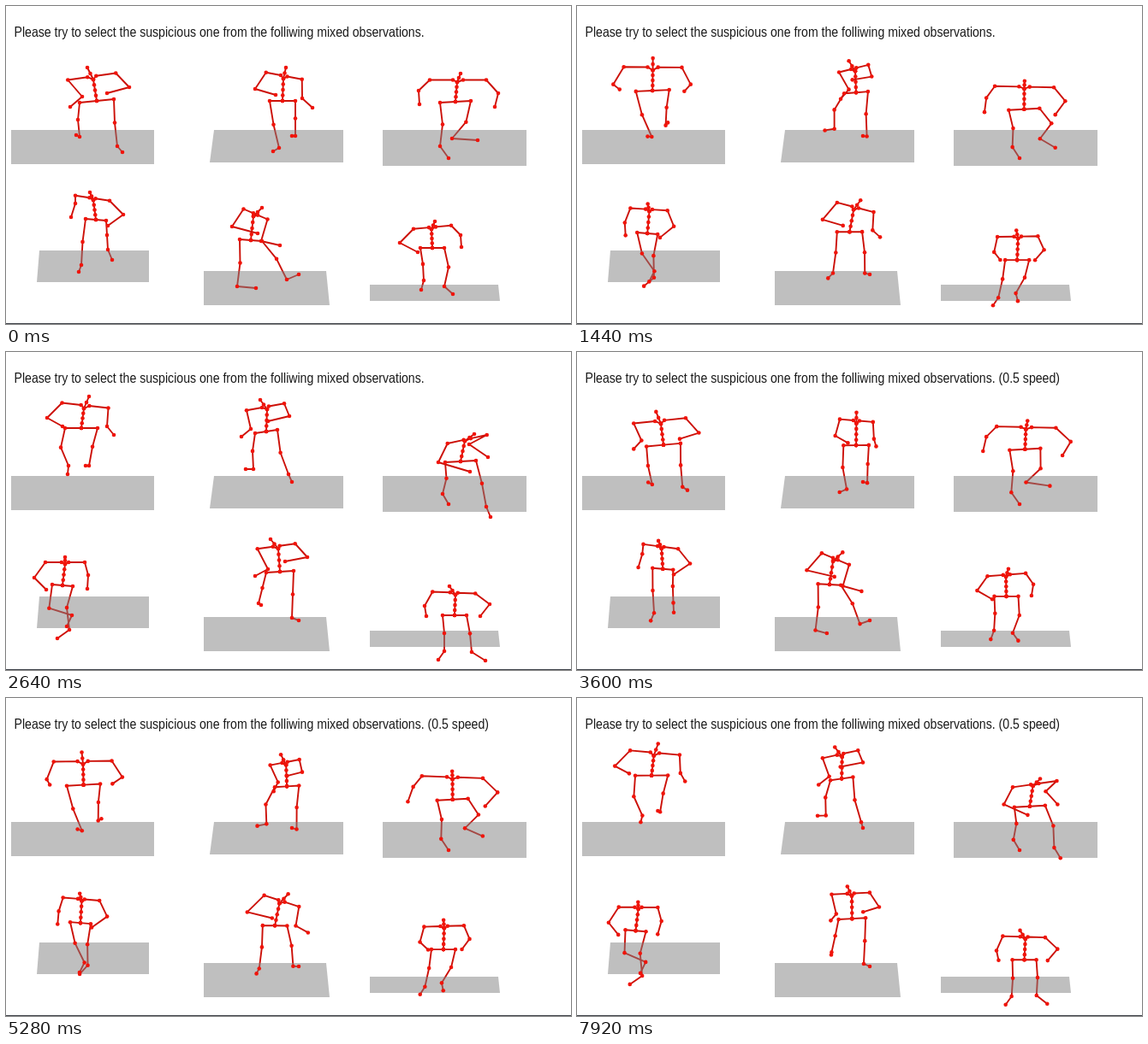
These frames come from a looping animation (660 by 372 pixels, 8000 ms). An HTML page with a canvas:

```html
<!DOCTYPE html>
<html lang="en">
<head>
<meta charset="utf-8">
<title>Mixed observations</title>
<style>
html, body { margin: 0; width: 660px; height: 372px; overflow: hidden; background: #fff; }
canvas { display: block; }
</style>
</head>
<body>
<canvas id="stage" width="660" height="372"></canvas>
<script>
const ctx = document.getElementById('stage').getContext('2d');
const LOOP = 8000, STEP = 80, WALK = 2640, SLOW_FROM = 2840, SLOW_ZERO = 3040;

// Each joint follows a parabola through start, middle and end (two points: a line, one: at rest).
// head is relative to neck; across and hips are half widths; arms hold elbow and hand,
// legs hold knee bend, ankle and toe, left limb first.
const walkers = [
  {
    floor: [[6, 145], [173, 145], [173, 185], [6, 185]],
    neck: [[102, 86], [89, 76], [91, 66]], head: [[-7, -14], [6, -14]],
    across: [[28, -4], [34, 0], [27, 3]],
    pelvis: [[106, 111], [89, 100], [88, 89]], hips: [[20, -2], [19, 0]],
    arms: [[[[89, 106], [44, 93], [48, 77]], [[75, 118], [50, 99], [66, 87]]],
           [[[144, 95], [134, 92], [118, 87]], [[118, 102], [125, 100], [126, 97]]]],
    legs: [[[-2, -2, -7], [[86, 153], [88, 154], [73, 133]], [[82, 151], [83, 153], [72, 143]]],
           [[-1], [[130, 164], [105, 141], [97, 133]], [[136, 171], [108, 138], [93, 133]]]]
  },
  {
    floor: [[243, 145], [394, 145], [394, 183], [238, 183]],
    neck: [[324, 85], [326, 77], [305, 67]], head: [[3, -13], [-7, -12], [-8, -11]],
    across: [[21, 4], [17, -4], [22, -4]],
    pelvis: [[323, 111], [327, 102], [304, 93]], hips: [[15, 0], [13, -2]],
    arms: [[[[291, 97], [318, 98], [286, 90]], [[315, 104], [310, 109], [275, 99]]],
           [[[346, 108], [345, 84], [331, 75]], [[358, 119], [324, 88], [306, 81]]]],
    legs: [[[-1, -6, -2], [[319, 166], [302, 145], [289, 137]], [[312, 170], [291, 147], [280, 137]]],
           [[0, -3], [[338, 152], [339, 153], [330, 143]], [[334, 152]]]]
  },
  {
    floor: [[440, 145], [608, 145], [608, 187], [440, 187]],
    neck: [[527, 89], [522, 96], [536, 104]], head: [[4, -10], [0, -9], [11, -8]],
    across: [[33, 0], [35, 1], [23, -5]],
    pelvis: [[525, 112], [522, 120], [531, 128]], hips: [[18, -1]],
    arms: [[[[482, 99], [477, 106], [505, 129]], [[483, 115], [473, 123], [542, 140]]],
           [[[575, 102], [572, 111], [541, 108]], [[571, 118], [559, 127], [563, 123]]]],
    legs: [[[3], [[507, 164], [510, 166]], [[517, 178]]],
           [[6, 14, 1], [[521, 155], [539, 154], [561, 181]], [[551, 157], [558, 164], [566, 193]]]]
  },
  {
    floor: [[39, 286], [167, 286], [167, 323], [36, 323]],
    neck: [[102, 227], [86, 239], [69, 248]], head: [[-4, -9], [0, -8]],
    across: [[20, 3], [23, 0]],
    pelvis: [[105, 250], [84, 265], [66, 273]], hips: [[12, 1]],
    arms: [[[[81, 231], [58, 252], [33, 264]], [[76, 247], [58, 267], [47, 278]]],
           [[[137, 244], [115, 257], [96, 261]], [[119, 257], [98, 270], [95, 277]]]],
    legs: [[[-1, -4, -18], [[88, 303], [91, 310], [77, 308]], [[85, 311], [85, 322], [71, 321]]],
           [[0, -5], [[119, 285], [92, 316], [74, 325]], [[124, 297], [81, 326], [60, 335]]]]
  },
  {
    floor: [[231, 310], [374, 310], [378, 350], [231, 350]],
    neck: [[289, 246], [322, 239], [318, 230]], head: [[10, -10], [9, -11], [-9, -11]],
    across: [[14, 6], [21, 6], [22, -3]],
    pelvis: [[286, 274], [317, 265], [320, 257]], hips: [[13, 1], [16, -1]],
    arms: [[[[264, 258], [285, 250], [306, 254]], [[294, 266], [311, 257], [291, 262]]],
           [[[298, 275], [343, 264], [352, 240]], [[320, 280], [354, 272], [326, 245]]]],
    legs: [[[2, 0], [[270, 328], [298, 314], [295, 294]], [[292, 330], [293, 320], [298, 296]]],
           [[3, 0], [[328, 320], [336, 313], [334, 311]], [[342, 314]]]]
  },
  {
    floor: [[425, 326], [575, 326], [577, 345], [425, 345]],
    neck: [[497, 261], [514, 271], [525, 284]], head: [[4, -9], [-7, -10]],
    across: [[22, -2], [25, 1]],
    pelvis: [[498, 283], [513, 296], [524, 308]], hips: [[14, 0]],
    arms: [[[[460, 277], [486, 287], [489, 297]], [[481, 288], [494, 296], [491, 309]]],
           [[[531, 268], [544, 284], [565, 295]], [[532, 282], [534, 296], [554, 309]]]],
    legs: [[[1], [[488, 321], [491, 340], [512, 350]], [[485, 332], [485, 349], [505, 360]]],
           [[5, 1], [[512, 328], [511, 335], [544, 351]], [[522, 337], [513, 344], [560, 361]]]]
  }
];

function parabola([a, b = a, c], u) {
  if (c === undefined) return a + (b - a) * u;
  return a * (1 - 2 * u) * (1 - u) + 4 * b * u * (1 - u) - c * u * (1 - 2 * u);
}

const add = (p, q, k = 1) => [p[0] + k * q[0], p[1] + k * q[1]];
const mix = (p, q, k) => [p[0] + (q[0] - p[0]) * k, p[1] + (q[1] - p[1]) * k];

// Middle of the leg, pushed sideways
function knee(hip, ankle, bend) {
  const [x, y] = add(ankle, hip, -1);
  return add(mix(hip, ankle, .5), [y, -x], bend / Math.hypot(x, y));
}

// Chains of joints that make up one body
function limbs(w, u) {
  const at = path => [0, 1].map(axis => parabola(path.map(p => p[axis]), u));
  const neck = at(w.neck), tilt = at(w.head), pelvis = at(w.pelvis);
  const chest = add(neck, tilt, .25);
  const chains = [[
    add(neck, tilt), add(neck, tilt, .5), neck,
    ...[.25, .5, .75].map(k => mix(neck, pelvis, k)), pelvis
  ]];
  [-1, 1].forEach((side, i) => {
    const shoulder = add(chest, at(w.across), side);
    const hip = add(pelvis, at(w.hips), side);
    const [bend, ankle, toe] = w.legs[i];
    chains.push([neck, mix(chest, shoulder, .18), shoulder, ...w.arms[i].map(at)]);
    chains.push([pelvis, hip, knee(hip, at(ankle), parabola(bend, u)), at(ankle), at(toe)]);
  });
  return chains;
}

function trace(points) {
  ctx.beginPath();
  points.forEach(p => ctx.lineTo(...p));
}

function drawWalker(w, u) {
  const chains = limbs(w, u);
  ctx.strokeStyle = '#cc1008';
  ctx.lineWidth = 1.9;
  ctx.lineJoin = 'round';
  for (const chain of chains) {
    trace(chain);
    ctx.stroke();
  }
  ctx.fillStyle = 'rgba(128,128,128,.5)';
  trace(w.floor);
  ctx.fill();
  ctx.fillStyle = '#f0140a';
  for (const joint of chains.flat()) {
    ctx.beginPath();
    ctx.arc(...joint, 2.3, 0, 7);
    ctx.fill();
  }
}

function drawTitle(slow) {
  ctx.save();
  ctx.translate(9.5, 36);
  ctx.scale(.83, 1);   // narrow cut of the typeface
  ctx.font = '17px "Liberation Sans", Arial, sans-serif';
  ctx.fillStyle = '#1a1a1a';
  ctx.fillText('Please try to select the suspicious one from the folliwing mixed observations.'
    + (slow ? ' (0.5 speed)' : ''), 0, 0);
  ctx.restore();
}

function draw(now) {
  const t = Math.floor(now % LOOP / STEP) * STEP;
  const slow = t >= SLOW_FROM;
  const u = (slow ? (t - SLOW_ZERO) / 2 : t) / WALK;
  ctx.fillStyle = '#fff';
  ctx.fillRect(0, 0, 660, 372);
  drawTitle(slow);
  walkers.forEach(w => drawWalker(w, u));
  ctx.fillStyle = '#3c4046';
  ctx.fillRect(0, 371, 660, 1);
}

const start = performance.now();
function tick() {
  draw(performance.now() - start);
  requestAnimationFrame(tick);
}
tick();
</script>
</body>
</html>
```
